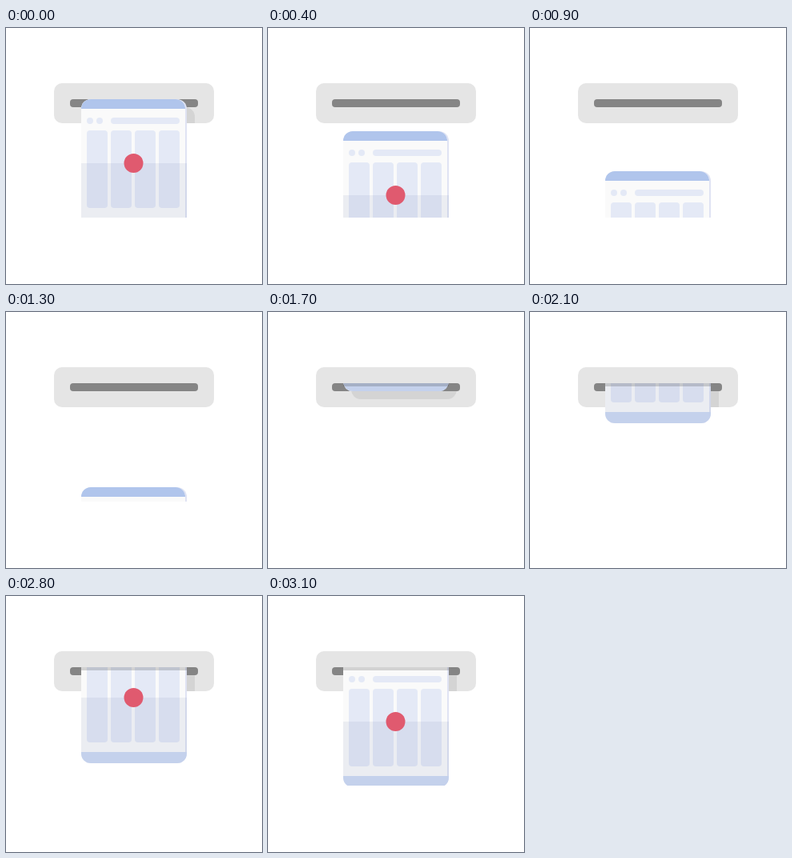
Recreate the animation shown at these times as an HTML page with a canvas. Size 320x320 px, loop 3.2 s.

```html
<!DOCTYPE html>
<html lang="en">
<head>
<meta charset="utf-8">
<title>Page printer</title>
<style>
html, body { margin: 0; width: 100%; height: 100%; overflow: hidden; background: #fff; }
canvas { display: block; }
</style>
</head>
<body>
<canvas id="stage" width="320" height="320"></canvas>
<script>
const ctx = document.getElementById('stage').getContext('2d');
const LOOP = 3200, HALF = 1600, STEP = 100;
const SLOT_Y = 89, FLOOR_Y = 237, PAGE_X = 94, PAGE_H = 162;

function box(x, y, w, h, color, radius = 0) {
  ctx.fillStyle = color;
  ctx.beginPath();
  ctx.roundRect(x, y, w, h, radius);
  ctx.fill();
}

function dot(x, y, r, color) {
  ctx.fillStyle = color;
  ctx.beginPath();
  ctx.arc(x, y, r, 0, Math.PI * 2);
  ctx.fill();
}

function clipped(x, y, w, h, paint) {
  ctx.save();
  ctx.beginPath();
  ctx.rect(x, y, w, h);
  ctx.clip();
  paint();
  ctx.restore();
}

function drawPage(top) {
  ctx.translate(PAGE_X, top);
  box(0, 0, 132, PAGE_H, '#dfe3f3', 12);
  box(0, 0, 130, PAGE_H, '#fafafa', 12);
  box(0, 0, 130, 12, '#b0c5ec', [12, 12, 0, 0]);
  dot(11, 27, 4, '#e4e9f6');
  dot(23, 27, 4, '#e4e9f6');
  box(37, 23, 86, 8, '#e4e9f6', 4);
  for (let i = 0; i < 4; i++) box(7 + i * 30, 39, 26, 97, '#e4e9f6', 4);
  box(0, 80, 132, 68, 'rgba(100, 115, 170, 0.1)');
  box(0, 148, 132, 14, '#c4d1ec', [0, 0, 12, 12]);
  dot(65.5, 80, 12, '#e05a6f');
}

function draw(time) {
  const t = Math.floor(time % LOOP / STEP) * STEP;
  const feeding = t >= HALF;
  const travel = t % HALF / 10;
  const top = SLOT_Y + travel - (feeding ? PAGE_H : 0);

  ctx.clearRect(0, 0, 320, 320);
  box(60, 69, 200, 50, '#e5e5e5', 10);
  box(80, 89, 160, 10, '#858585', 4);

  // The page shadow falls only on the machine, below the slot.
  if (t !== HALF) clipped(60, 99, 200, 20, () =>
    box(PAGE_X + 10, top + 10, 132, PAGE_H, '#d4d4d4', 12));

  clipped(0, SLOT_Y, 320, FLOOR_Y - SLOT_Y, () => {
    drawPage(top);
    if (feeding && travel) {
      ctx.setTransform(1, 0, 0, 1, 0, 0);
      box(PAGE_X, SLOT_Y, 132, 4, 'rgba(0, 0, 0, 0.16)');
    }
  });
}

const start = performance.now();
function tick() {
  draw(performance.now() - start);
  requestAnimationFrame(tick);
}
tick();
</script>
</body>
</html>
```
